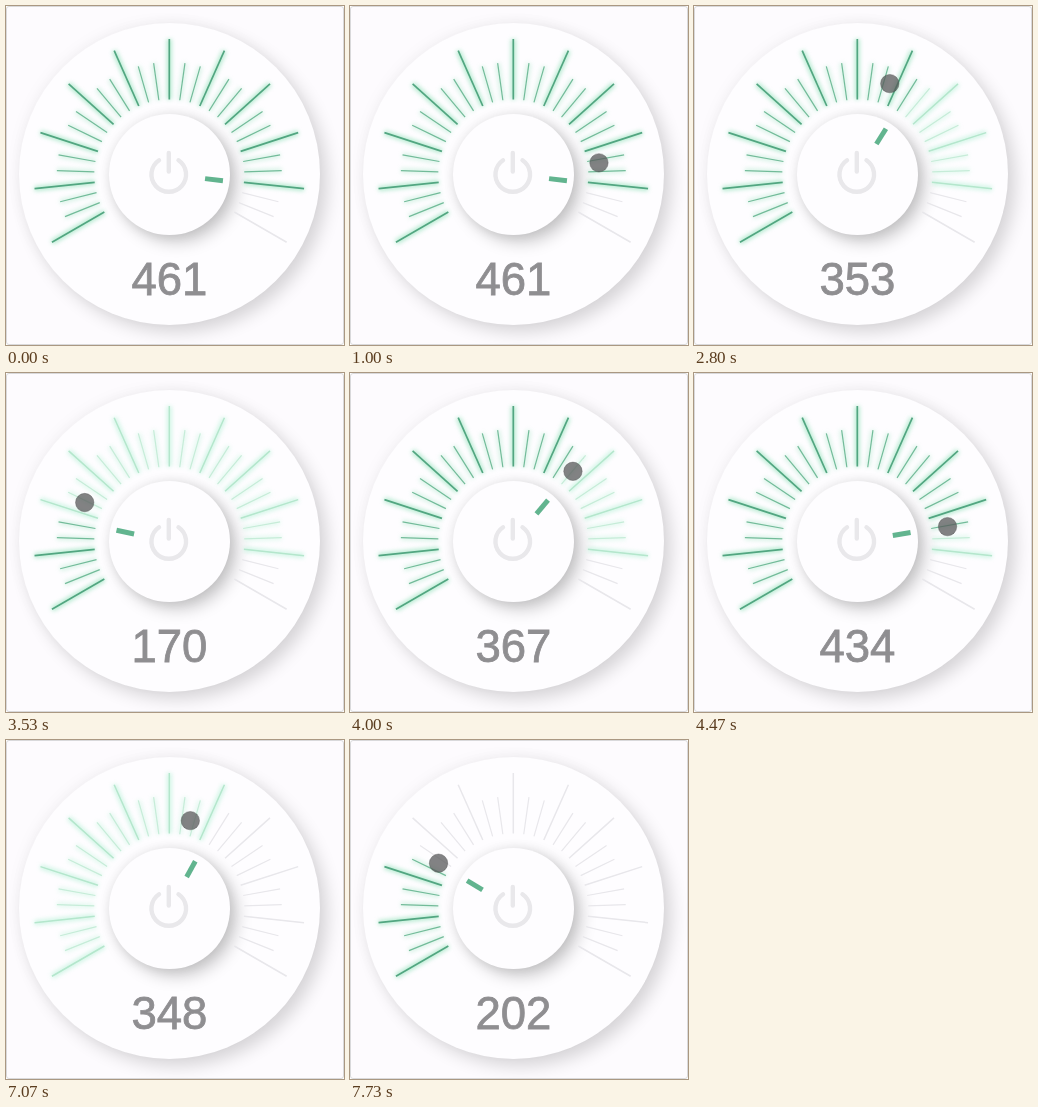
Animation of 338 by 339 pixels, one loop 8 s. Source, as an HTML page:

```html
<!DOCTYPE html>
<html lang="en">
<head>
<meta charset="utf-8">
<title>Temperature dial</title>
<style>
  html, body { margin: 0; width: 100%; height: 100%; overflow: hidden; background: #fff; }
  .stage {
    position: relative; width: 338px; height: 339px; box-sizing: border-box;
    overflow: hidden; border: 1px solid #d9d9db; border-radius: 3px; background: #fdfbfe;
  }
  .disc { position: absolute; border-radius: 50%; background: #fefdff; }
  .dial {
    left: 12px; top: 16px; width: 301px; height: 302px;
    box-shadow: 7px 7px 17px rgba(0, 0, 0, .16), -4px -4px 14px rgba(0, 0, 0, .025);
  }
  .knob {
    left: 102px; top: 107px; width: 121px; height: 121px;
    box-shadow: 7px 7px 16px rgba(0, 0, 0, .21), 0 0 12px rgba(0, 0, 0, .08);
  }
  svg { position: absolute; left: -1px; top: -1px; }
  #cores { stroke: #e8e7eb; stroke-width: 1.2; }
  #cores .soft { stroke: #c6ecd8; }
  #cores .full { stroke: #72bb99; }
  #cores .long { stroke-width: 1.5; }
  #cores .long.soft { stroke: #b4e6cc; }
  #cores .long.full { stroke: #52a681; stroke-width: 1.7; }
  #halos { stroke: none; stroke-width: 5; filter: blur(2px); }
  #halos .soft { stroke: rgba(170, 240, 205, .3); }
  #halos .full { stroke: rgba(140, 225, 180, .32); }
  #halos .long.soft { stroke: rgba(165, 240, 205, .5); }
  #halos .long.full { stroke: rgba(130, 222, 175, .58); }
  text {
    font: 45.5px "Liberation Sans", Arial, sans-serif; text-anchor: middle;
    fill: #8f8e91; stroke: #8f8e91; stroke-width: .8;
  }
</style>
</head>
<body>
<div class="stage">
  <div class="disc dial"></div>
  <div class="disc knob"></div>
  <svg width="338" height="339" viewBox="0 0 338 339">
    <g id="halos"></g>
    <g id="cores"></g>
    <g fill="none" stroke="#e9e8eb" stroke-width="4.4" stroke-linecap="round">
      <path d="M153 154.2A17.3 17.3 0 1 0 172.5 154.2"/>
      <path d="M162.8 147V165.5"/>
    </g>
    <rect id="marker" x="160.8" y="114.5" width="5" height="18" fill="#62b48f"/>
    <text id="value" x="163.4" y="288.8"></text>
    <circle id="cursor" r="9.2" fill="rgba(88,88,90,.74)" stroke="rgba(80,80,82,.4)"/>
  </svg>
</div>
<script>
  const CX = 163.3, CY = 168.5;
  const MIN = -120, START = 96.6, LAG = 0.7;
  const STEPS = 120, STEP_MS = 1000 / 15;
  const CURSOR_IN = 15, PRESS = 28, RELEASE = 72, SETTLE = 73;
  const POWER_OFF = 81, PRESS_AGAIN = 96, SETTLE_AGAIN = 116;

  // Pointer moves: from step, to step, angle, radius
  const moves = [
    [0, 15, 82, 86],
    [15, 17, 41, 167],
    [20, 23, 14, 137],
    [27, 28.5, 14, 98],
    [28.5, 31.3, 73.5, 98],
    [37, 49.5, -83.3, 94],
    [51.5, 57.5, 40, 92],
    [61, 66, 80.4, 91],
    [67, 72, 80.4, 120],
    [73, 78, 119.6, 21],
    [87, 88, 145.8, 15],
    [88, 92, 225.4, 98],
    [96, 101, 445, 93],
    [101, 111, 301.2, 88]
  ];

  const $ = id => document.getElementById(id);
  const ease = p => (1 - Math.cos(Math.PI * p)) / 2;

  function addLine(parent, angle, length) {
    const line = document.createElementNS('http://www.w3.org/2000/svg', 'line');
    const outer = 75 + length;
    const attrs = { x1: CX, x2: CX, y1: CY - 75, y2: CY - outer, transform: `rotate(${angle} ${CX} ${CY})` };
    for (const name in attrs) line.setAttribute(name, attrs[name]);
    return $(parent).appendChild(line);
  }

  const ticks = Array.from({ length: 31 }, (_, i) => {
    const angle = MIN + i * 8, long = i % 3 === 0;
    const lines = ['halos', 'cores'].map(id => addLine(id, angle, long ? 60.5 : 37.5));
    return { angle, lines, base: long ? 'long' : '' };
  });

  function pointer(k) {
    let [, , angle, radius] = moves[0];
    for (const [from, to, a, r] of moves) {
      if (k < from) break;
      const p = ease(Math.min(1, (k - from) / (to - from)));
      angle += (a - angle) * p;
      radius += (r - radius) * p;
    }
    return { angle, radius };
  }

  // While held, the knob trails the pointer slightly.
  function knobAngle(k) {
    if (k < PRESS) return START;
    if (k < POWER_OFF) return pointer(Math.min(k - LAG, RELEASE)).angle;
    if (k < PRESS_AGAIN) return MIN;
    return Math.max(MIN, pointer(k - LAG).angle - 360);
  }

  // The confirmed level catches up once the knob has rested.
  function confirmed(k, angle) {
    if (k < SETTLE) return START;
    if (k < POWER_OFF || k >= SETTLE_AGAIN) return angle;
    return MIN;
  }

  function draw(k) {
    const angle = knobAngle(k), level = confirmed(k, angle);
    const low = Math.min(angle, level), high = Math.max(angle, level);
    for (const t of ticks) {
      const state = t.angle < low ? 'full' : t.angle < high ? 'soft' : '';
      for (const line of t.lines) line.setAttribute('class', `${t.base} ${state}`);
    }
    $('marker').setAttribute('transform', `rotate(${angle} ${CX} ${CY})`);
    $('value').textContent = Math.round(100 + (angle - MIN) / 0.6);

    const at = pointer(k), dir = at.angle * Math.PI / 180;
    $('cursor').setAttribute('cx', CX + 0.5 + at.radius * Math.sin(dir));
    $('cursor').setAttribute('cy', CY + 0.3 - at.radius * Math.cos(dir));
    $('cursor').style.display = k < CURSOR_IN ? 'none' : '';
  }

  const start = performance.now();
  function loop() {
    const t = performance.now() - start;
    draw(Math.floor((t + 5) / STEP_MS) % STEPS);
    requestAnimationFrame(loop);
  }
  loop();
</script>
</body>
</html>
```
